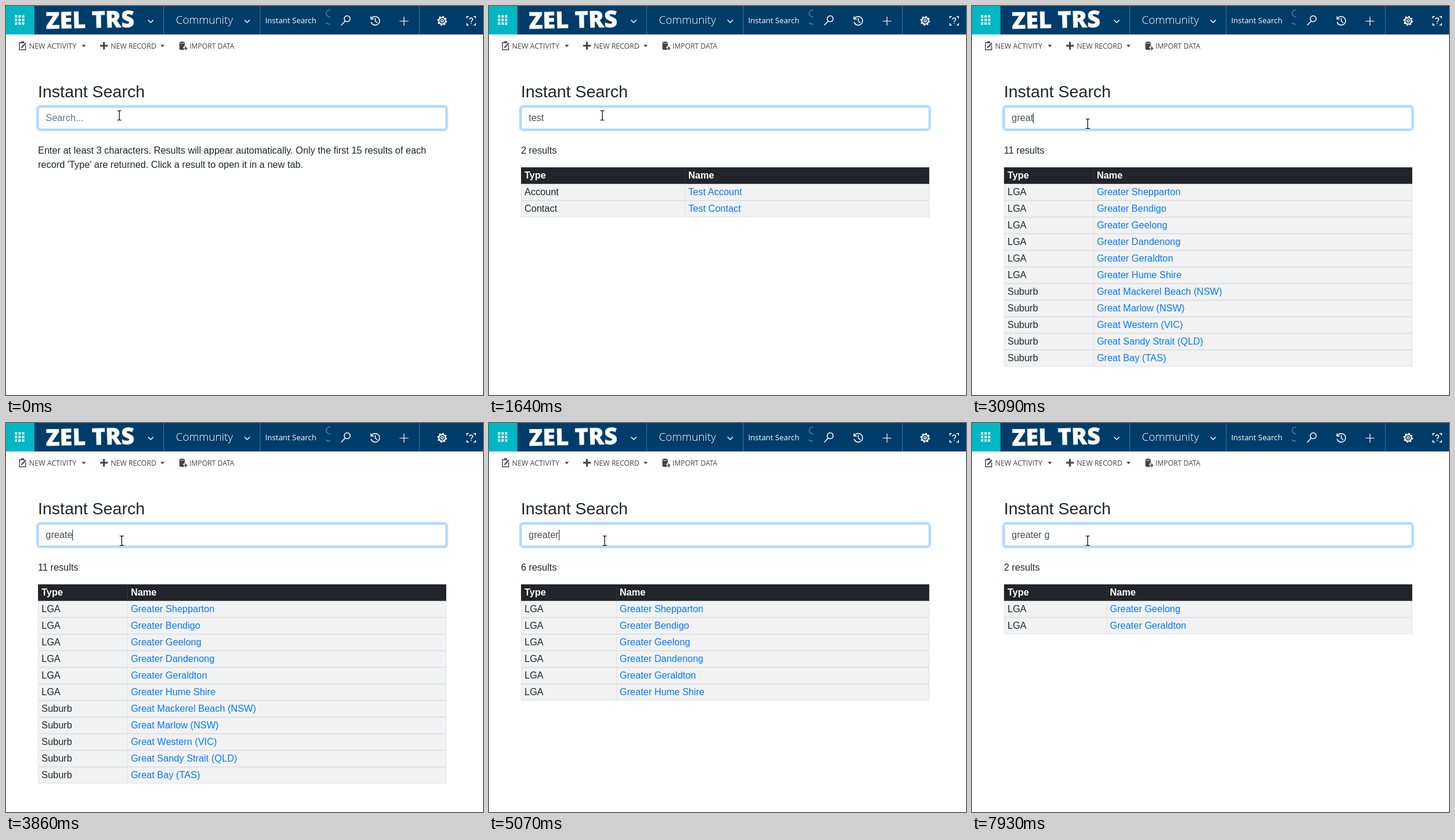
An HTML page for the animation above (8000 ms loop, 806 px wide and 656 px high).

```html
<!DOCTYPE html>
<html lang="en">
<head>
<meta charset="utf-8">
<title>Instant Search</title>
<style>
  html, body { margin: 0; width: 100%; height: 100%; overflow: hidden; background: #fff; }
  #stage { position: relative; width: 806px; height: 656px; overflow: hidden;
    font: 16px/24px "Liberation Sans", Arial, sans-serif; color: #212529; }
  #stage > * { position: absolute; }
  svg { left: 0; top: 0; }
  .ui { font-family: "Open Sans", "Noto Sans", sans-serif; }
  h1 { left: 54px; top: 128px; margin: 0; font-size: 28px; line-height: 34px; font-weight: 400; white-space: nowrap; }
  #box { left: 54px; top: 170px; width: 690px; height: 38px; box-sizing: border-box; padding: 6px 12px;
    border: 1px solid #80bdff; border-radius: 4px; box-shadow: 0 0 0 3.2px rgba(0,123,255,.25);
    color: #495057; white-space: pre; }
  #field { position: relative; display: inline-block; height: 24px; vertical-align: top; }
  #field.empty { color: #587b8e; }
  #field mark { background: #3297fd; color: #fff; }
  #caret { position: absolute; left: 100%; top: 3px; width: 1px; height: 18px; background: #212529; }
  .empty #caret { left: 0; }
  #info { left: 54px; top: 232px; white-space: pre; }
  table { left: 54px; top: 272px; width: 690px; border-collapse: separate; border-spacing: 0; }
  th, td { padding: 1px 5px; border: 1px solid #dee2e6; border-right: 0; text-align: left; white-space: nowrap; background: #f2f2f2; }
  th { background: #212529; border-color: #32383e; color: #fff; }
  th:last-child, td:last-child { border-right: 1px solid #dee2e6; }
  th:last-child { border-right-color: #32383e; }
  td + td { color: #007bff; }
</style>
</head>
<body>
<div id="stage">
  <svg width="806" height="96" fill="none">
    <rect width="806" height="48" fill="#003c69"/>
    <rect width="48" height="48" fill="#00b7c3"/>
    <path d="M266.5 0V48M429.5 0V48M698.5 0V48" stroke="#44709a"/>
    <path d="M15 17.5H31M15 23.5H31M15 29.5H31" stroke="#fff" stroke-width="4" stroke-dasharray="4 2"/>
    <g class="ui" fill="#fff">
      <text x="67" y="37" font-size="39" font-weight="800" stroke="#d5dde4" stroke-width=".6" transform="rotate(-1.2 142 24)">ZEL TRS</text>
      <text x="287" y="30" font-size="18.7" font-weight="300">Community</text>
      <text x="438" y="29" font-size="13">Instant Search</text>
    </g>
    <g stroke="#fff" stroke-width="1.5">
      <path d="M240 23.5l4.5 4.5 4.5-4.5M403 23.5l4.5 4.5 4.5-4.5"/>
      <circle cx="576.5" cy="21.5" r="5"/>
      <path d="M573 25.5L566.5 32.5"/>
      <path d="M617.5 21.5A7.3 7.3 0 1 1 616.9 27M616.7 17.5V22H621.5M624 20.5V25.5L627.5 28.5"/>
      <path d="M665 25.5H680M672.5 18V33" stroke-width="1.2"/>
      <circle cx="737" cy="25" r="5.6" stroke-width="2"/>
      <circle cx="737" cy="25" r="7.2" stroke-width="2" stroke-dasharray="2.8 2.855"/>
      <circle cx="737" cy="25" r="2" stroke-width="1.4"/>
      <path d="M778.7 21V17.7H782M790 17.7H793.3V21M793.3 29V32.3H790M782 32.3H778.7V29"/>
      <path d="M783.3 22.5Q783.5 20.3 786 20.3T788.7 22.6Q788.7 24 787.2 25T786 27.3M786 28.8V30.3"/>
    </g>
    <path d="M548 6.2Q541 7.5 541 12.5T548 18.8M540.5 28.5Q543.5 30.7 548 30.7" stroke="#4b77a6" stroke-width="1.6"/>
    <g class="ui" fill="#444" font-size="12">
      <text x="39" y="72" font-size="12.2">NEW ACTIVITY</text>
      <text x="177" y="72">NEW RECORD</text>
      <text x="310" y="72" font-size="11.9">IMPORT DATA</text>
    </g>
    <path d="M128 65.5h7l-3.5 4zM261 65.5h7l-3.5 4z" fill="#444"/>
    <g stroke="#4a4148">
      <path d="M159 67H172M165.500 60.500V73.500" stroke-width="3"/>
      <path d="M31 61.700H22.700V73.700H33.300V66" stroke-width="1.400"/>
      <path d="M25.500 61H30.500" stroke-width="3"/>
      <path d="M26 70.500L33.500 62.500" stroke-width="2.200"/>
      <path d="M299.500 74.500V71.500H305M302.500 68.500L305.500 71.500 302.500 74.500" stroke-width="1.500"/>
    </g>
    <path d="M293 62Q293 60 297.500 60T302 62V67L299 70V74Q293 74 293 72.500Z" fill="#4a4148"/>
    <path d="M294 62.500Q297.500 64 301 62.500" stroke="#fff" stroke-width=".8"/>
  </svg>
  <h1>Instant Search</h1>
  <div id="box"><span id="field"><span id="text"></span><i id="caret"></i></span></div>
  <div id="info"></div>
  <table id="table"></table>
  <svg id="mouse" width="9" height="17" fill="none">
    <path d="M1 .5H3.500L4.500 1.500 5.500 .5H8M4.500 1.500V15.500M1 16.500H3.500L4.500 15.500 5.500 16.500H8" stroke="#000" stroke-width="1.200"/>
  </svg>
</div>
<script>
const $ = id => document.getElementById(id);
const LOOP = 8000;
const HINT = "Enter at least 3 characters. Results will appear automatically. Only the first 15 results of each\n" +
  "record 'Type' are returned. Click a result to open it in a new tab.";

const rows = (type, names) => names.map(name => [type, name]);
const greater = rows("LGA", ["Shepparton", "Bendigo", "Geelong", "Dandenong", "Geraldton", "Hume Shire"].map(n => "Greater " + n));
const great = rows("Suburb", ["Mackerel Beach (NSW)", "Marlow (NSW)", "Western (VIC)", "Sandy Strait (QLD)", "Bay (TAS)"].map(n => "Great " + n));
const lists = {
  test: [["Account", "Test Account"], ["Contact", "Test Contact"]],
  great: [...greater, ...great],
  greater,
  g: [greater[2], greater[4]],
  none: []
};

// Each step changes only the listed properties of the state before it.
const steps = [
  [0, { text: "", caret: 0, sel: 0, list: null, alpha: 1, x: 191, y: 184 }],
  [530, { caret: 1 }],
  [640, { text: "t" }],
  [750, { text: "te" }],
  [860, { text: "tes" }],
  [970, { list: "none" }],
  [1090, { text: "test" }],
  [1210, { list: "test", alpha: .5 }],
  [1310, { alpha: 1 }],
  [1640, { caret: 0 }],
  [1750, { x: 108, y: 188 }],
  [1860, { x: 48, y: 190, sel: 1 }],
  [1970, { x: 20, y: 190 }],
  [2080, { x: 78, y: 190 }],
  [2190, { text: "g", caret: 1, sel: 0, list: null, x: 159, y: 191 }],
  [2310, { text: "gr", x: 186, y: 196 }],
  [2430, { text: "gre", list: "none", x: 195, y: 198 }],
  [2530, { text: "grea" }],
  [2640, { text: "great" }],
  [2860, { list: "great", alpha: .35 }],
  [2970, { alpha: .7 }],
  [3090, { alpha: 1 }],
  [3190, { caret: 0 }],
  [3740, { caret: 1 }],
  [3850, { text: "greate" }],
  [3970, { list: "none" }],
  [4080, { list: "greater", alpha: .35 }],
  [4200, { alpha: .7 }],
  [4310, { alpha: 1 }],
  [4420, { caret: 0 }],
  [4630, { text: "greater", caret: 1 }],
  [4740, { list: "none" }],
  [4850, { list: "greater", alpha: .35 }],
  [4960, { alpha: .7 }],
  [5070, { alpha: 1 }],
  [5190, { text: "greater " }],
  [5740, { caret: 0 }],
  [6170, { caret: 1 }],
  [6390, { text: "greater g" }],
  [6500, { list: "none" }],
  [6610, { list: "g", alpha: .5 }],
  [6730, { alpha: 1 }],
  [6930, { caret: 0 }],
  [7380, { caret: 1 }],
  [7930, { caret: 0 }]
];
let state = {};
const states = steps.map(([at, change]) => ({ at, ...(state = { ...state, ...change }) }));

function tableHtml(list) {
  if (!list.length) return "";
  const body = list.map(([type, name]) => `<tr><td>${type}</td><td>${name}</td></tr>`).join("");
  return `<tr><th>Type</th><th>Name</th></tr>${body}`;
}

function show(s) {
  const tag = s.sel ? "mark" : "span";
  $("text").innerHTML = `<${tag}>${s.text || "Search..."}</${tag}>`;
  $("field").className = s.text ? "" : "empty";
  $("caret").style.visibility = s.caret ? "visible" : "hidden";
  const list = s.list ? lists[s.list] : [];
  $("info").textContent = s.list ? `${list.length} results` : HINT;
  $("table").innerHTML = tableHtml(list);
  $("table").style.opacity = s.alpha;
  $("mouse").style.left = s.x - 4 + "px";
  $("mouse").style.top = s.y - 8 + "px";
}

let shown;
function tick() {
  const t = performance.now() % LOOP;
  const now = states.findLast(s => s.at <= t);
  if (now !== shown) show(shown = now);
  requestAnimationFrame(tick);
}
tick();
</script>
</body>
</html>
```
